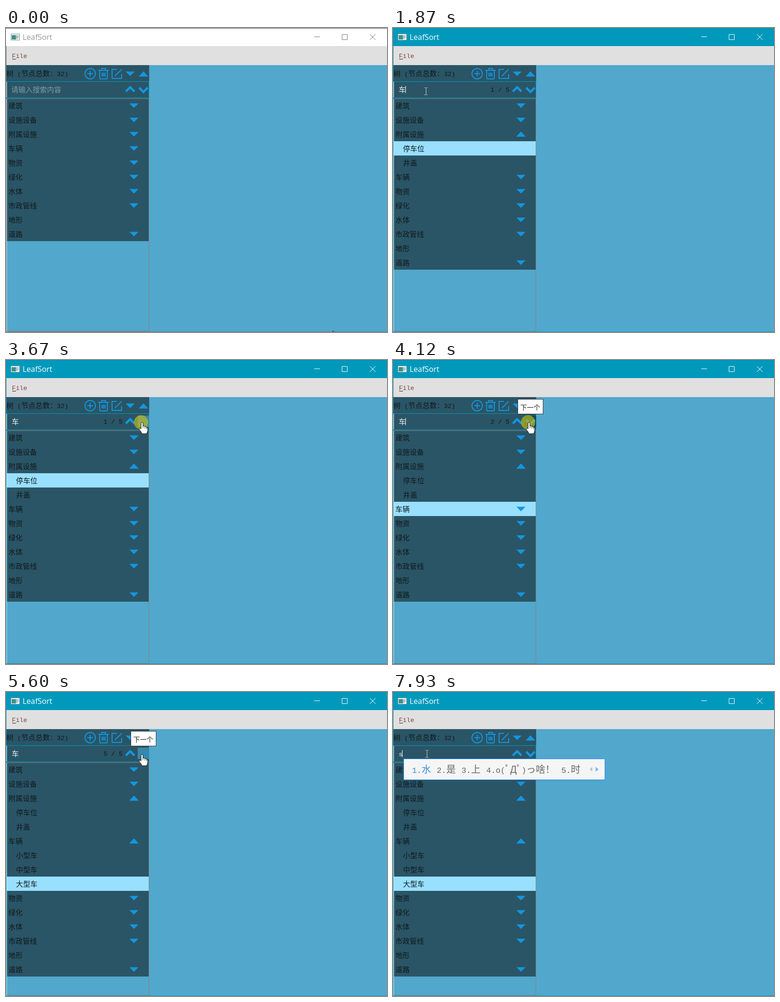
An HTML page for the animation above (8000 ms loop, 801 by 639 pixels).

```html
<!DOCTYPE html>
<html lang="zh">
<head>
<meta charset="utf-8">
<style>
html, body { margin: 0; width: 100%; height: 100%; overflow: hidden; background: #52a7cc; }
svg { display: block; width: 801px; height: 639px; }
text { white-space: pre; font-family: "Noto Sans CJK SC", "Noto Sans CJK", sans-serif; font-weight: 300; }
.mono { font-family: "Liberation Mono", monospace; }
.title { font-family: "Open Sans", sans-serif; font-size: 16px; font-weight: 400; }
.icon { fill: none; stroke: #1496e0; stroke-width: 2; }
.solid { fill: #1496e0; stroke: none; }
.thick { stroke-width: 4.6; }
</style>
</head>
<body>
<svg id="stage" viewBox="0 0 801 639"></svg>
<script>
const LOOP = 8000, PANEL = '#2a5566', ACCENT = '#0099bc', INK = '#10191e', TYPED = '#e6eef2';
const stage = document.getElementById('stage');

const rect = (x, y, w, h, fill, more = '') =>
  `<rect x="${x}" y="${y}" width="${w}" height="${h}" fill="${fill}" ${more}/>`;
const path = (d, cls = 'icon', more = '') => `<path class="${cls}" d="${d}" ${more}/>`;
const arrowDown = (x, y) => path(`M${x - 9.5} ${y - 4.5}h19l-9.5 9.5z`, 'solid');
const arrowUp = (x, y) => path(`M${x - 10} ${y + 5.5}h20l-10-11z`, 'solid');
const within = (t, spans) => spans.some(([from, to]) => t >= from && t < to);
const latest = (t, entries) => entries.filter(e => t >= e[0]).pop()[1];

// Half-width characters use a monospaced face, the rest the CJK face.
function label(s, x, y, fill = INK, size = 15, monoSize = 13.33) {
  const runs = s.replace(/[ -~]+/g, run => `<tspan class="mono" font-size="${monoSize}">${run}</tspan>`);
  return `<text x="${x}" y="${y}" fill="${fill}" font-size="${size}">${runs}</text>`;
}

// Name, children (or whether there are any), and when the branch opens.
const tree = [
  ['建筑', true], ['设施设备', true], ['附属设施', ['停车位', '井盖'], 1870],
  ['车辆', ['小型车', '中型车', '大型车'], 4350],
  ['物资', true], ['绿化', true], ['水体', true], ['市政管线', true], ['地形', false], ['道路', true]
];
const matches = [[0, ''], [1870, '停车位'], [3900, '车辆'], [4350, '小型车'], [4830, '中型车'], [5600, '大型车']];
const typing = [[0, ''], [1390, 'c'], [1466, 'ch'], [1540, 'che'], [1870, '车'], [7700, ''], [7930, 's']];
const clicks = [[770, 840], [3670, 3823], [4040, 4270], [4430, 4750], [4910, 5150], [5290, 5520], [5900, 6080]];
const presses = [[3747, 3900], [4120, 4350], [4510, 4830], [5380, 5600]];

const buttons = [
  { x: 165, y: 84, art: '<circle class="icon" cx="177" cy="96" r="11"/>' + path('M171 96h12M177 90v12') },
  { x: 193, y: 84, art: path('M194 89h22M201 88v-3h8v3M197 90v15q0 2 2 2h12q2 0 2-2v-15M202 94v8M205 94v8M208 94v8') },
  { x: 221, y: 84, art: path('M233 87h-10v19h20v-9M229 101l14-14') },
  { x: 249, y: 84, art: arrowDown(261, 96) },
  { x: 277, y: 84, art: arrowUp(289, 96.5) },
  { x: 249, y: 117, art: path('M252 133.500l9-9l9 9', 'icon thick') },
  { x: 277, y: 117, art: path('M280 125.500l9 9l9-9', 'icon thick') }
];

// Pointer moves are sampled, so every move is a run of held positions.
const ease = f => f * f * (3 - 2 * f);
const approach = Array.from({ length: 8 }, (_, i) => {
  const f = ease((i + 1) / 8);
  return [687 - 618 * f, 636 - 503 * f];
});
const moves = [
  [0, 0, [[687, 636]]],
  [70, 600, approach],
  [2710, 3360, [[72, 132], [90, 128], [125, 124], [170, 119], [215, 114], [240, 109], [255, 108], [267, 112], [274, 117]]],
  [3500, 3500, [[287, 131]]],
  [6450, 6690, [[270, 128], [215, 118], [150, 104], [94, 93]]],
  [6860, 7330, [[82, 103], [58, 122], [51, 129], [55, 137], [62, 135], [68, 132], [71, 130]]]
];
function pointerAt(t) {
  const [from, to, points] = moves.filter(m => t >= m[0]).pop();
  const gap = (to - from) / (points.length - 1) || 1;
  return points[Math.min(points.length - 1, Math.floor((t - from) / gap + 1e-6))];
}
const isOver = ([x, y], b) => x >= b.x && x < b.x + 24 && y >= b.y && y < b.y + 26;

function drawPointer([x, y]) {
  let art;
  if (buttons.some(b => isOver([x, y], b))) {
    art = '<path d="M-3 12V2Q-3 0-1 0T1 2V8Q4 6.500 5 9Q8 8 8.500 10.500Q11 10 11 13V17Q11 21 8 24H-1Q-3 19-7 15Q-7 11-3 13.500Z" fill="#fff" stroke="#111"/>' +
      '<path d="M1 8v4M5 9v4M8.500 11v3" stroke="#111" stroke-width=".8"/>';
  } else if (y >= 113 && y < 147 && x < 250) {
    art = '<path d="M-3-7.500h2.500M1-7.500h2.500M.5-7v14M-3 7.500h2.500M1 7.500h2.500" stroke="#d9d0c5" fill="none"/>';
  } else {
    art = '<path d="M.5.500V16L4 12.500L6.500 18.500L9 17.500L6.500 11.500H11Z" fill="#fff" stroke="#111"/>';
  }
  return `<g transform="translate(${x.toFixed(1)} ${y.toFixed(1)})">${art}</g>`;
}

function drawWindow(active) {
  const ink = active ? '#fff' : '#999', edge = active ? ACCENT : '#66777e';
  return rect(0, 0, 801, 639, '#52a7cc') +
    rect(0, 0, 801, 38, active ? ACCENT : '#fff') +
    rect(0, 0, 801, 1, active ? '#078bad' : '#4a4548') +
    rect(10.5, 12.5, 18, 13, '#f4f6f6', 'stroke="#8b979b"') +
    rect(12, 15, 9, 9, '#3c8f88') + rect(22, 15, 2, 8, '#78a8b8') + rect(25, 15, 2, 6, '#b3c3c8') +
    `<text class="title" x="35" y="25" fill="${ink}">LeafSort</text>` +
    path('M648 18.500h12M706.500 13.500h11v11h-11zM765 13l12 12M777 13l-12 12', '',
      `fill="none" stroke="${active ? '#fff' : '#777'}"`) +
    rect(0, 38, 801, 40, '#e0e0e0') + label('File', 12.5, 63, '#7b4538') + rect(13, 65, 8, 1, '#222') +
    rect(0, 38, 1, 601, edge) + rect(0, 638, 801, 1, edge);
}

function drawTree(t) {
  const selected = latest(t, matches);
  let y = 148, out = '';
  const row = (name, x, arrow) => {
    out += rect(2, y, 298, 30, name === selected ? '#99e0ff' : PANEL) + label(name, x, y + 20.5);
    if (arrow) out += arrow(269, y + 15);
    y += 30;
  };
  for (const [name, children, openAt] of tree) {
    const open = t >= openAt;
    row(name, 5, children && (open ? arrowUp : arrowDown));
    if (open) children.forEach(child => row(child, 21));
  }
  return out + path('M1.500 148.500H300.500V637.500H1.500', '', 'fill="none" stroke="#858483"') +
    rect(1, 149, 1, 489, '#d5ebf3');
}

function isCaretOn(t) {
  if (t < 2180) return within(t, [[600, 1160], [1390, 1710], [1870, 2180]]);
  return t >= 7700 || Math.floor((t - 2180) / 530) % 2 === 1;
}

function drawSearch(t) {
  const typed = latest(t, typing);
  const count = matches.filter(m => t >= m[0]).length - 1;
  const caretX = 11 + (typed === '车' ? 15 : typed.length * 8);
  return rect(1, 78, 300, 70, PANEL) + label('树 (节点总数：32)', 1, 101) +
    rect(1.5, 112.5, 299, 34, PANEL, `stroke="${ACCENT}"`) + rect(1, 113, 1, 33, '#d5ebf3') +
    (typed ? label(typed, 12, 134.5, TYPED) : label('请输入搜索内容', 11, 135, '#7f9ba6')) +
    (typed === '车' ? label(`${count} / 5`, 205, 134) : '') +
    (isCaretOn(t) ? rect(caretX, 122, 1, 15, '#fff') : '');
}

function drawButtons(t, pointer) {
  return buttons.map(b => {
    const hover = isOver(pointer, b), pressed = hover && within(t, presses);
    const back = hover ? rect(b.x, b.y, 24, 24, pressed ? '#0c4a5a' : '#3d86a6') : '';
    return `${back}<g opacity="${hover && !pressed ? 0.5 : 1}">${b.art}</g>`;
  }).join('');
}

function drawCandidates(t) {
  const early = within(t, [[1390, 1870]]);
  if (!early && t < 7930) return '';
  const words = early ? ['车', t < 1466 ? '从' : '彻', '扯', '撤', '车辆'] : ['水', '是', '上', 'o(ﾟДﾟ)っ啥！', '时'];
  const right = early ? 366 : 446;
  const starts = [40, 92, 144, 196, early ? 248 : 354];
  return rect(22.5, 140.5, right - 23, 44, '#f5f5f5', 'stroke="#1a8cff"') +
    words.map((w, i) => label(`${i + 1}.${w}`, starts[i], 169.5, i ? '#666' : '#3b8de0', 20, 16.67)).join('') +
    path(`M${right - 27} 157.500v10l-6-5z`, '', 'fill="#c0c8cf"') +
    path(`M${right - 20} 157.500v10l6-5z`, '', 'fill="#74b4f4"');
}

function draw(t) {
  const pointer = pointerAt(t), [x, y] = pointer;
  const tooltip = within(t, [[3900, 6450]])
    ? rect(262.5, 82.5, 53, 31, '#fff', 'stroke="#333"') + label('下一个', 267.5, 104.5, '#222', 14) : '';
  const spot = within(t, clicks)
    ? `<circle cx="${x - 3}" cy="${y}" r="15" fill="#c8be14" fill-opacity=".65"/>` : '';
  return drawWindow(t >= 600) + drawSearch(t) + drawTree(t) + drawButtons(t, pointer) +
    drawCandidates(t) + tooltip + spot + drawPointer(pointer);
}

let shown = '';
function tick() {
  const next = draw(performance.now() % LOOP);
  if (next !== shown) stage.innerHTML = shown = next;
  requestAnimationFrame(tick);
}
tick();
</script>
</body>
</html>
```
